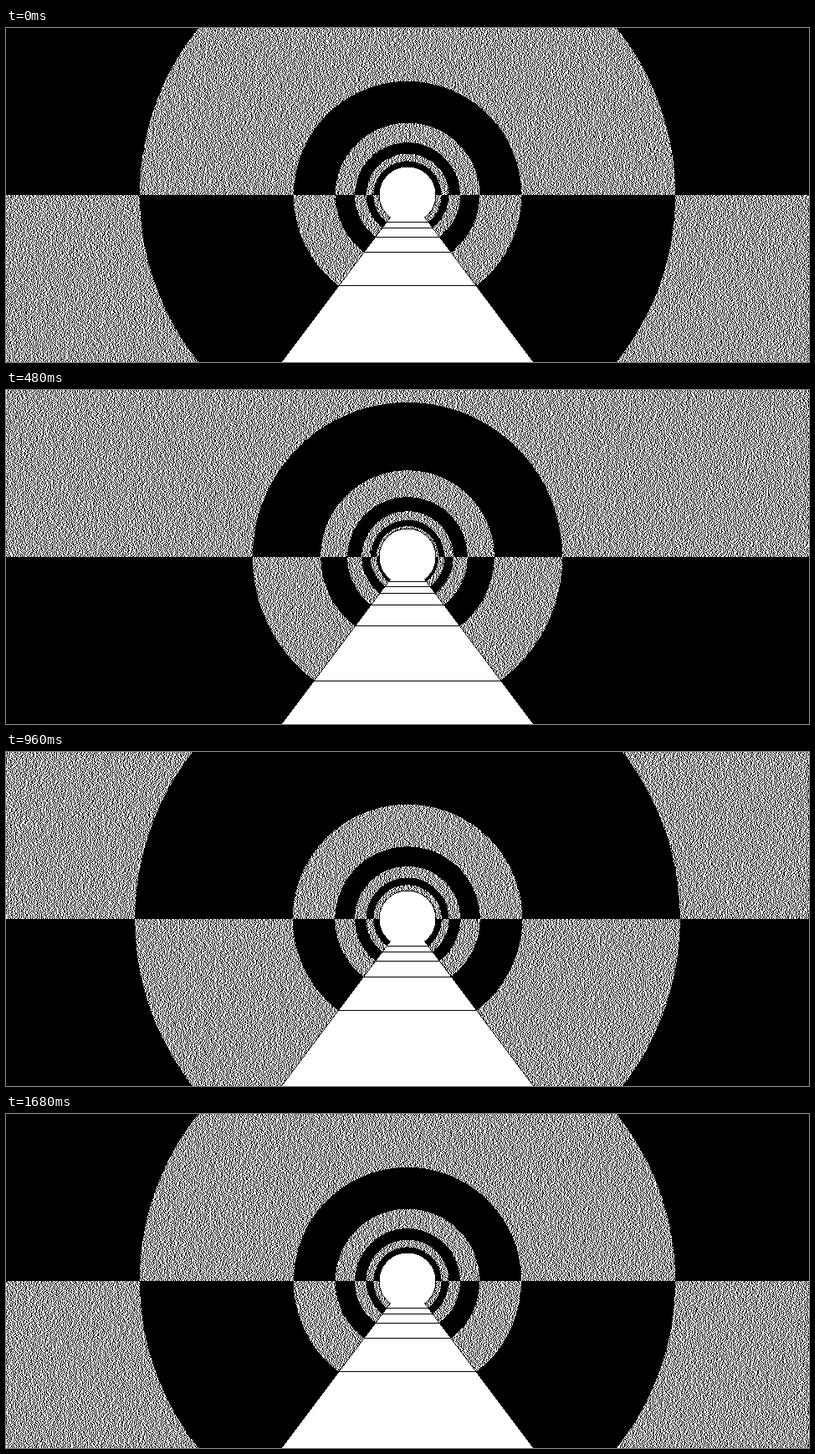
An HTML page with a canvas that plays this animation: 960 px wide and 400 px high, repeating every 1.76 s.

```html
<!DOCTYPE html>
<html lang="en">
<head>
<meta charset="utf-8">
<title>Tunnel</title>
<style>
  html, body { margin: 0; width: 100%; height: 100%; overflow: hidden; background: #000; }
  canvas { display: block; }
</style>
</head>
<body>
<canvas width="960" height="400"></canvas>
<script>
const W = 960, H = 400, LOOP = 1760, CYCLE = 840;
const BLACK = 0xff000000, WHITE = 0xffffffff;
const GRAIN_LEVEL = 0.62, DISC = 33.5;
const ctx = document.querySelector('canvas').getContext('2d');
const image = ctx.createImageData(W, H);
const pixels = new Uint32Array(image.data.buffer);

// Tunnel depth in ring widths at a given distance from the centre.
const depth = r => 240 / (r + 1.2) - 0.747;

const depths = new Float32Array(W * H);
for (let y = 0, i = 0; y < H; y++)
  for (let x = 0; x < W; x++) depths[i++] = depth(Math.hypot(x - 479.5, y - 199.5));

// The camera surges forward by one ring per cycle, nearly resting in between.
function travel(t) {
  const x = t / CYCLE, a = 2 * Math.PI * x;
  return x - 0.1076 * Math.sin(a) - 0.0766 * (1 - Math.cos(a)) - 0.0174 * Math.sin(2 * a);
}

// Uneven hold times: 80 and 40 ms in turn, later 120 ms.
function heldTime(t) {
  const rest = t % 120;
  return t - rest + (t < 960 && rest >= 80 ? 80 : 0);
}

function render(t) {
  const shift = travel(t);
  let seed = t * 7919 + 12345 | 0, carry = 0;
  const random = () => {
    seed ^= seed << 13;
    seed ^= seed >>> 17;
    seed ^= seed << 5;
    return (seed >>> 0) / 2 ** 32;
  };
  // Carrying the error along keeps the random grain fine and even.
  const grain = () => {
    carry += GRAIN_LEVEL;
    if (carry <= random()) return BLACK;
    carry--;
    return WHITE;
  };
  const ring = r => Math.floor(depth(r) + shift);

  for (let y = 0, i = 0; y < H; y++) {
    const dy = y - 199.5, below = dy > 0 ? 1 : 0;
    const halfPath = dy > 26 ? 0.75 * dy : -1;
    const seam = dy > 28 && ring((dy - 0.5) / 0.8) !== ring((dy + 0.5) / 0.8);
    for (let x = 0; x < W; x++, i++) {
      const dx = Math.abs(x - 479.5), r = Math.sqrt(dx * dx + dy * dy);
      let color;
      if (dx < halfPath) color = seam ? BLACK : WHITE;
      else if (r < DISC) color = WHITE;
      else if (dx < halfPath + 1 || r < DISC + 1) color = BLACK;
      else color = (Math.floor(depths[i] + shift) & 1) === below ? grain() : BLACK;
      pixels[i] = color;
    }
  }
  ctx.putImageData(image, 0, 0);
}

const start = performance.now();
let shown = -1;
function tick() {
  const t = heldTime((performance.now() - start) % LOOP);
  if (t !== shown) render(shown = t);
  requestAnimationFrame(tick);
}
tick();
</script>
</body>
</html>
```
